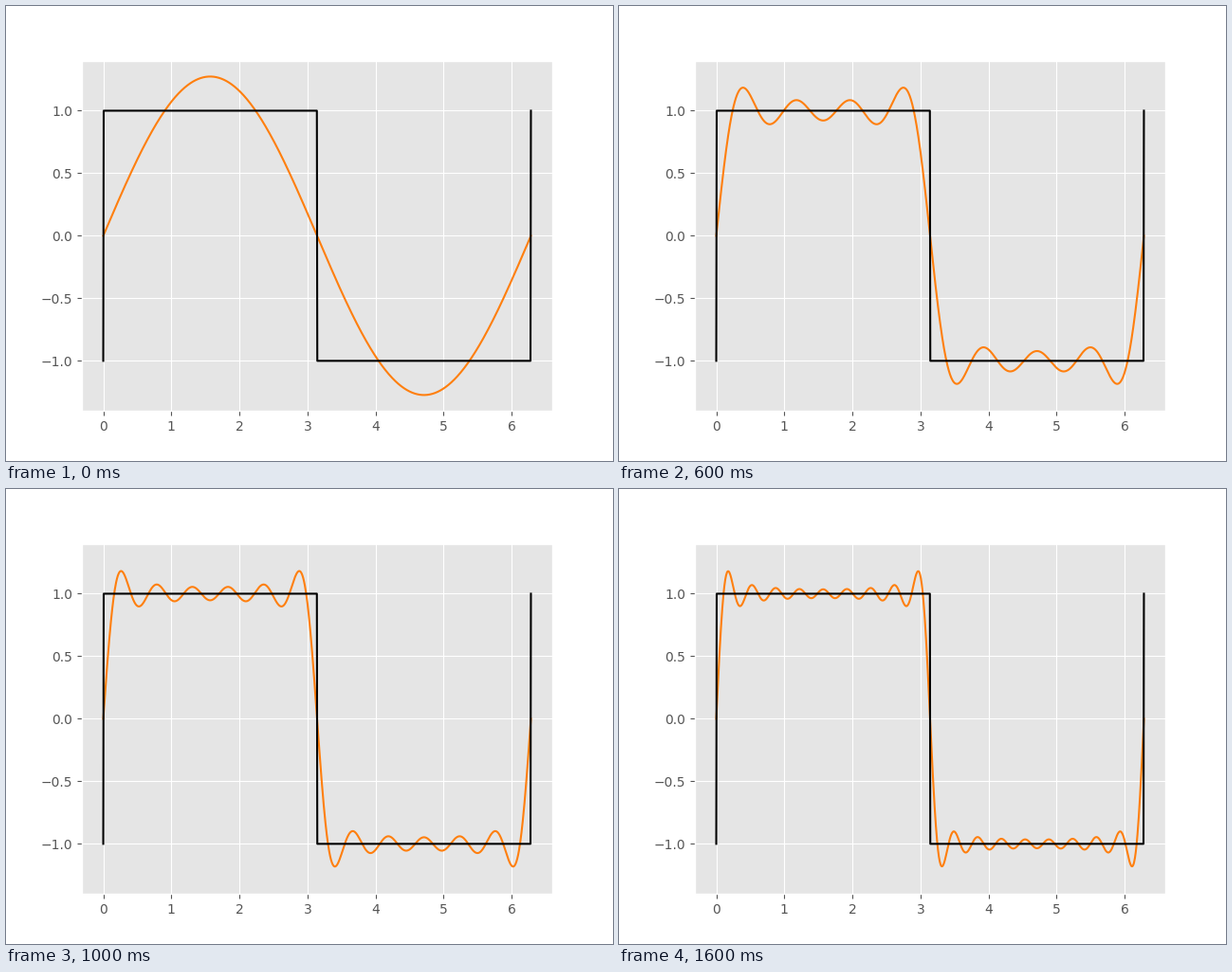
Recreate the animation shown at these times as a matplotlib script. Size 640 by 480 pixels, loop 1800 ms.

```python
import numpy as np
import matplotlib.pyplot as plt
from matplotlib.animation import FuncAnimation

FRAMES = 9
INTERVAL = 200

plt.rcParams.update({
    "font.family": "DejaVu Sans",
    "font.size": 10,
    "figure.facecolor": "white",
    "axes.facecolor": "#E5E5E5",
    "axes.edgecolor": "white",
    "axes.linewidth": 1.0,
    "axes.grid": True,
    "axes.axisbelow": True,
    "grid.color": "white",
    "grid.linestyle": "-",
    "xtick.color": "#555555",
    "ytick.color": "#555555",
    "lines.linewidth": 1.5,
})

x = np.linspace(0, 2 * np.pi, 1000)


def fourier(terms):
    """Partial Fourier sum of the unit square wave."""
    odd = 2 * np.arange(terms)[:, None] + 1
    return 4 / np.pi * np.sum(np.sin(odd * x) / odd, axis=0)


# Square wave whose end points already belong to the neighbouring half periods
square = np.where(x < np.pi, 1.0, -1.0)
square[0], square[-1] = -1.0, 1.0

fig, ax = plt.subplots(figsize=(6.4, 4.8), dpi=100)
curve, = ax.plot(x, fourier(1), color="#ff7f0e")
ax.plot(x, square, color="black")


def update(frame):
    curve.set_ydata(fourier(frame + 1))
    return curve,


anim = FuncAnimation(fig, update, frames=FRAMES, interval=INTERVAL,
                     repeat=True, repeat_delay=0)
plt.show()
```
